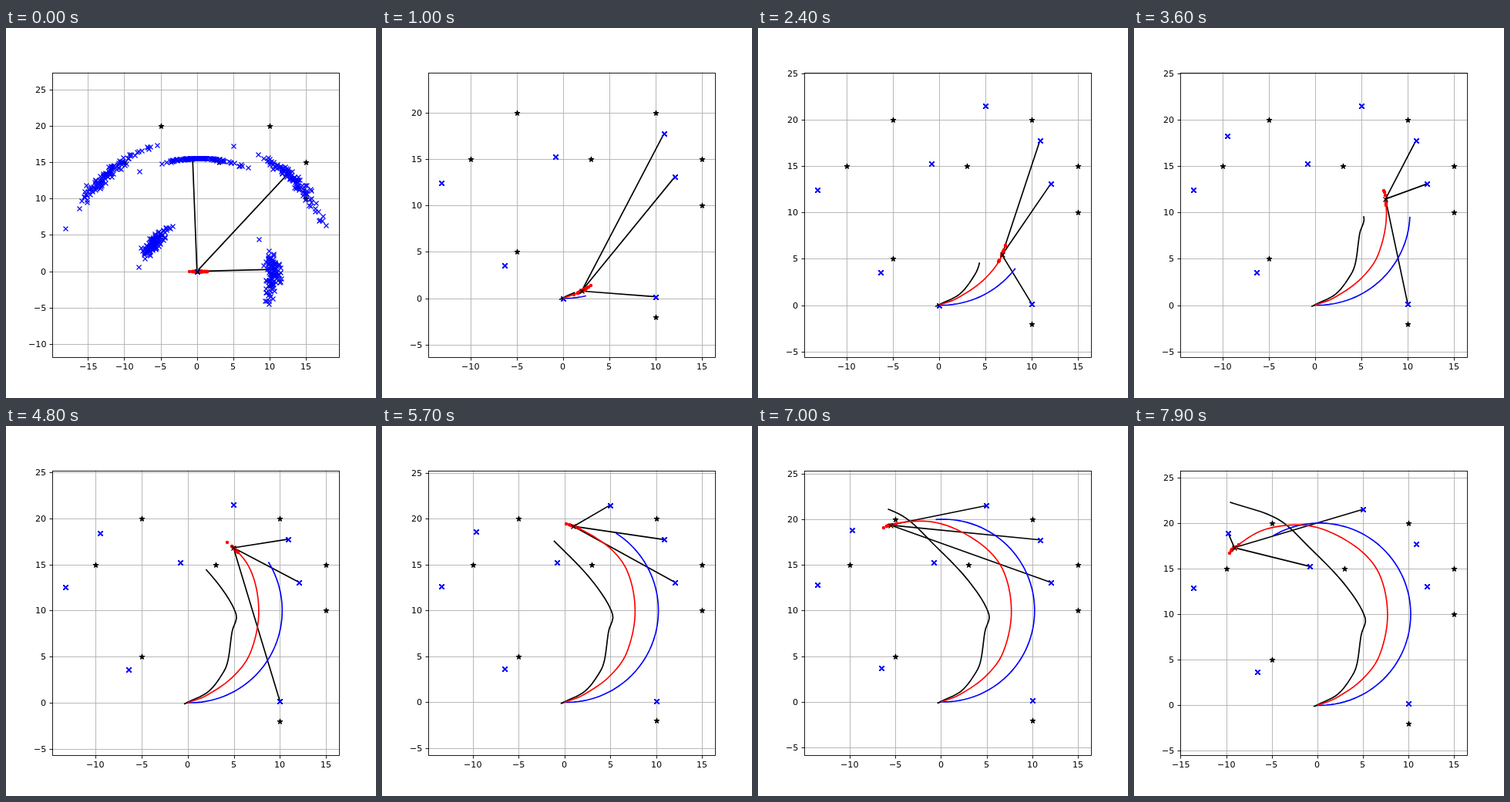
Write an HTML page with a canvas that moves like this. It is 480 px wide and 480 px high and loops after 8 s.

```html
<!DOCTYPE html>
<html>
<head>
<meta charset="utf-8">
<style>
html, body { margin: 0; width: 100%; height: 100%; overflow: hidden; background: #fff; }
canvas { display: block; }
</style>
</head>
<body>
<canvas id="stage" width="480" height="480"></canvas>
<script>
const ctx = document.getElementById("stage").getContext("2d");
const STEPS = 80, STEP_MS = 100, START = 6, RANGE = 20, PT = 80 / 72;
const BOX = { l: 60, r: 432, t: 57.6, b: 427.2 };

// True position of each beacon and where the filter places it
const beacons = [
  { pos: [10, -2], guess: [10, .16] },
  { pos: [15, 10], guess: [12.05, 13.08] },
  { pos: [15, 15], guess: [10.88, 17.74] },
  { pos: [10, 20], guess: [4.98, 21.5] },
  { pos: [3, 15], guess: [-.83, 15.24] },
  { pos: [-5, 20], guess: [-9.45, 18.25] },
  { pos: [-5, 5], guess: [-6.35, 3.57] },
  { pos: [-10, 15], guess: [-13.15, 12.42] }
];

// Key points of the curves: time, x, y
const estimateKeys = [
  [5, 0, 0], [10, 2, .77], [17.3, 4.87, 2.78], [24, 6.8, 5.42], [33, 7.71, 9.95],
  [42.5, 6.72, 14.59], [50.3, 4.03, 17.54], [60.3, -.61, 19.65], [70, -5.55, 19.36],
  [79, -9.1, 17.3], [82, -10, 16.2]
];
const reckonKeys = [
  [0, 0, 0], [3, -.35, -.12], [6, 0, .05], [13, 2.26, 1.22], [20, 3.86, 3.29], [24, 4.37, 4.6],
  [31.3, 4.82, 7.75], [36, 5.25, 9.6], [44.5, 3.1, 13.15], [55.9, -.78, 17.24],
  [66.2, -4.31, 20.42], [79, -9.58, 22.29]
];

const clamp = (v, lo, hi) => Math.min(hi, Math.max(lo, v));
const steps = n => Array.from({ length: n }, (_, i) => i);

// Smooth curve through the keys
function curve(keys, t) {
  const last = keys.length - 1;
  let i = 0;
  while (i < last - 1 && keys[i + 1][0] < t) i++;
  const span = keys[i + 1][0] - keys[i][0], f = clamp((t - keys[i][0]) / span, 0, 1);
  const slope = (n, axis) => {
    const a = keys[Math.max(0, n - 1)], b = keys[Math.min(last, n + 1)];
    return (b[axis] - a[axis]) / (b[0] - a[0]);
  };
  return [1, 2].map(axis => {
    const a = keys[i][axis], b = keys[i + 1][axis];
    return a + (b - a) * f * f * (3 - 2 * f)
      + span * f * (1 - f) * (slope(i, axis) * (1 - f) - slope(i + 1, axis) * f);
  });
}

function randomFrom(seed) {
  return () => {
    seed = seed + 0x6D2B79F5 | 0;
    let t = Math.imul(seed ^ seed >>> 15, 1 | seed);
    t = t + Math.imul(t ^ t >>> 7, 61 | t) ^ t;
    return ((t ^ t >>> 14) >>> 0) / 4294967296;
  };
}

// The robot waits, then drives a circle
const truth = [[0, 0]];
for (let k = 1; k < STEPS; k++) {
  const [x, y] = truth[k - 1], yaw = .05 * (k - START);
  truth.push(k < START ? [0, 0] : [x + .5 * Math.cos(yaw), y + .5 * Math.sin(yaw)]);
}
const estimate = steps(STEPS).map(k => curve(estimateKeys, k));
const reckon = steps(STEPS).map(k => curve(reckonKeys, k));

const inRange = ({ pos }, k) => Math.hypot(pos[0] - truth[k][0], pos[1] - truth[k][1]) <= RANGE;
beacons.forEach(b => b.firstSeen = steps(STEPS).find(k => inRange(b, k)));

// Initial particles: heading error and shift along x; best one and both extremes are fixed
const rand = randomFrom(11);
const gauss = () => (rand() + rand() + rand() + rand() - 2) * 1.73;
const BEST = .06;
const cloud = [[BEST, .4], [.48, -.65], [-.42, .75]];
while (cloud.length < 100)
  cloud.push([clamp(gauss() * .15, -.38, .38), clamp(.4 + gauss() * .5, -1.3, 1.4)]);
cloud.sort((p, q) => Math.abs(p[0] - BEST) - Math.abs(q[0] - BEST));

function mapPoints({ guess: [x, y], firstSeen }, k) {
  if (k < firstSeen) return [[0, 0]];
  // Beacons on the left drift outward late in the run
  const grow = x < -2 ? 1 + .035 * Math.sqrt(clamp((k - 45) / 34, 0, 1)) : 1;
  const fade = Math.max(0, 1 - k / 8);
  const r = Math.hypot(x, y) * (grow + .02 * fade), angle = Math.atan2(y, x);
  const survivors = Math.max(1, Math.round(100 * Math.exp(-.75 * k)));
  return cloud.slice(0, survivors).map(([turn, shift]) => {
    const a = angle + (turn - .05) * fade;
    return [shift * fade + r * Math.cos(a), r * Math.sin(a)];
  });
}

function particles(k) {
  if (k < 8) {
    const [x, y] = estimate[k], a = .05 * k;
    return cloud.map(([, s]) => [x + s * Math.cos(a), y + s * Math.sin(a)]);
  }
  const next = randomFrom(k * 97);
  const count = Math.round(8 + 34 * Math.exp((10 - k) / 6));
  const reach = 1.5 + Math.max(0, 1 - k / 40);
  return steps(count).map(i => {
    const u = i < 2 ? 2 * i - 1 : next() + next() - 1;
    return curve(estimateKeys, k + .2 + reach * u);
  });
}

function limits(points) {
  const xs = points.map(p => p[0]), ys = points.map(p => p[1]);
  const x0 = Math.min(...xs), x1 = Math.max(...xs), y0 = Math.min(...ys), y1 = Math.max(...ys);
  const scale = Math.min((BOX.r - BOX.l) / (x1 - x0), (BOX.b - BOX.t) / (y1 - y0)) / 1.1;
  return { scale, cx: (x0 + x1) / 2, cy: (y0 + y1) / 2 };
}

const snap = v => Math.round(v) + .5;

function stroke(points, color, width) {
  ctx.strokeStyle = color;
  ctx.lineWidth = width;
  ctx.beginPath();
  points.forEach(p => ctx.lineTo(...p));
  ctx.stroke();
}

function cross([px, py], color, copies = 1) {
  const x = snap(px), y = snap(py), h = 3;
  ctx.strokeStyle = color;
  ctx.lineWidth = PT;
  ctx.beginPath();
  ctx.moveTo(x - h, y - h);
  ctx.lineTo(x + h, y + h);
  ctx.moveTo(x - h, y + h);
  ctx.lineTo(x + h, y - h);
  while (copies-- > 0) ctx.stroke();
}

function star([px, py]) {
  ctx.beginPath();
  for (let i = 0; i < 10; i++) {
    const r = 3 * PT * (i % 2 ? .382 : 1), a = i * Math.PI / 5;
    ctx.lineTo(snap(px) + r * Math.sin(a), snap(py) - r * Math.cos(a));
  }
  ctx.closePath();
  ctx.fillStyle = ctx.strokeStyle = "#000";
  ctx.lineWidth = PT;
  ctx.fill();
  ctx.stroke();
}

function dot([x, y]) {
  ctx.fillStyle = "#f00";
  ctx.beginPath();
  ctx.arc(Math.round(x), Math.round(y), 2 * PT, 0, 7);
  ctx.fill();
}

function ticks(lo, hi) {
  const list = [];
  for (let v = Math.ceil(lo / 5) * 5; v <= hi; v += 5) list.push(v);
  return list;
}

// Writes a tick label; align is the share of its width left of x
function label(value, x, y, align) {
  const text = String(value).replace("-", "\u2212");
  ctx.fillText(text, Math.round(x - ctx.measureText(text).width * align), Math.round(y));
}

function draw(k) {
  const map = beacons.map(b => mapPoints(b, k));
  const swarm = particles(k);
  const paths = [[truth, "#00f"], [reckon, "#000"], [estimate, "#f00"]]
    .map(([path, color]) => [path.slice(0, k + 1), color]);
  const { scale, cx, cy } = limits([
    ...beacons.map(b => b.pos), ...map.flat(), ...swarm, ...paths.flatMap(p => p[0])
  ]);
  const midX = (BOX.l + BOX.r) / 2, midY = (BOX.t + BOX.b) / 2;
  const X = x => midX + (x - cx) * scale, Y = y => midY - (y - cy) * scale;
  const P = ([x, y]) => [X(x), Y(y)];
  const halfW = (BOX.r - BOX.l) / 2 / scale, halfH = (BOX.b - BOX.t) / 2 / scale;
  const xTicks = ticks(cx - halfW, cx + halfW), yTicks = ticks(cy - halfH, cy + halfH);
  const thin = .8 * PT;

  ctx.fillStyle = "#fff";
  ctx.fillRect(0, 0, 480, 480);
  xTicks.forEach(v => stroke([[snap(X(v)), BOX.t], [snap(X(v)), BOX.b]], "#b0b0b0", thin));
  yTicks.forEach(v => stroke([[BOX.l, snap(Y(v))], [BOX.r, snap(Y(v))]], "#b0b0b0", thin));

  ctx.save();
  ctx.beginPath();
  ctx.rect(BOX.l, BOX.t, BOX.r - BOX.l, BOX.b - BOX.t);
  ctx.clip();
  ctx.lineJoin = "round";
  beacons.forEach(b => star(P(b.pos)));
  map.filter((_, i) => inRange(beacons[i], k)).slice(0, 3)
    .forEach(list => stroke([P(estimate[k]), P(list[0])], "#000", 1.5 * PT));
  swarm.forEach(p => dot(P(p)));
  // Coinciding markers build up to a heavier cross
  map.forEach(list => list.forEach(p => cross(P(p), "#00f", Math.ceil(100 / list.length))));
  paths.forEach(([path, color]) => stroke(path.map(P), color, 1.5 * PT));
  cross(P(estimate[k]), "#000");
  ctx.restore();

  ctx.strokeStyle = ctx.fillStyle = "#000";
  ctx.lineWidth = thin;
  ctx.strokeRect(snap(BOX.l), snap(BOX.t), 372, 369);
  ctx.font = `${10 * PT}px "DejaVu Sans", sans-serif`;
  xTicks.forEach(v => {
    stroke([[snap(X(v)), 427.5], [snap(X(v)), 431.5]], "#000", thin);
    label(v, X(v), 443, .5);
  });
  yTicks.forEach(v => {
    stroke([[56.5, snap(Y(v))], [60.5, snap(Y(v))]], "#000", thin);
    label(v, 52.2, Y(v) + 4, 1);
  });
}

function tick() {
  draw(Math.floor(performance.now() / STEP_MS) % STEPS);
  requestAnimationFrame(tick);
}
tick();
</script>
</body>
</html>
```
